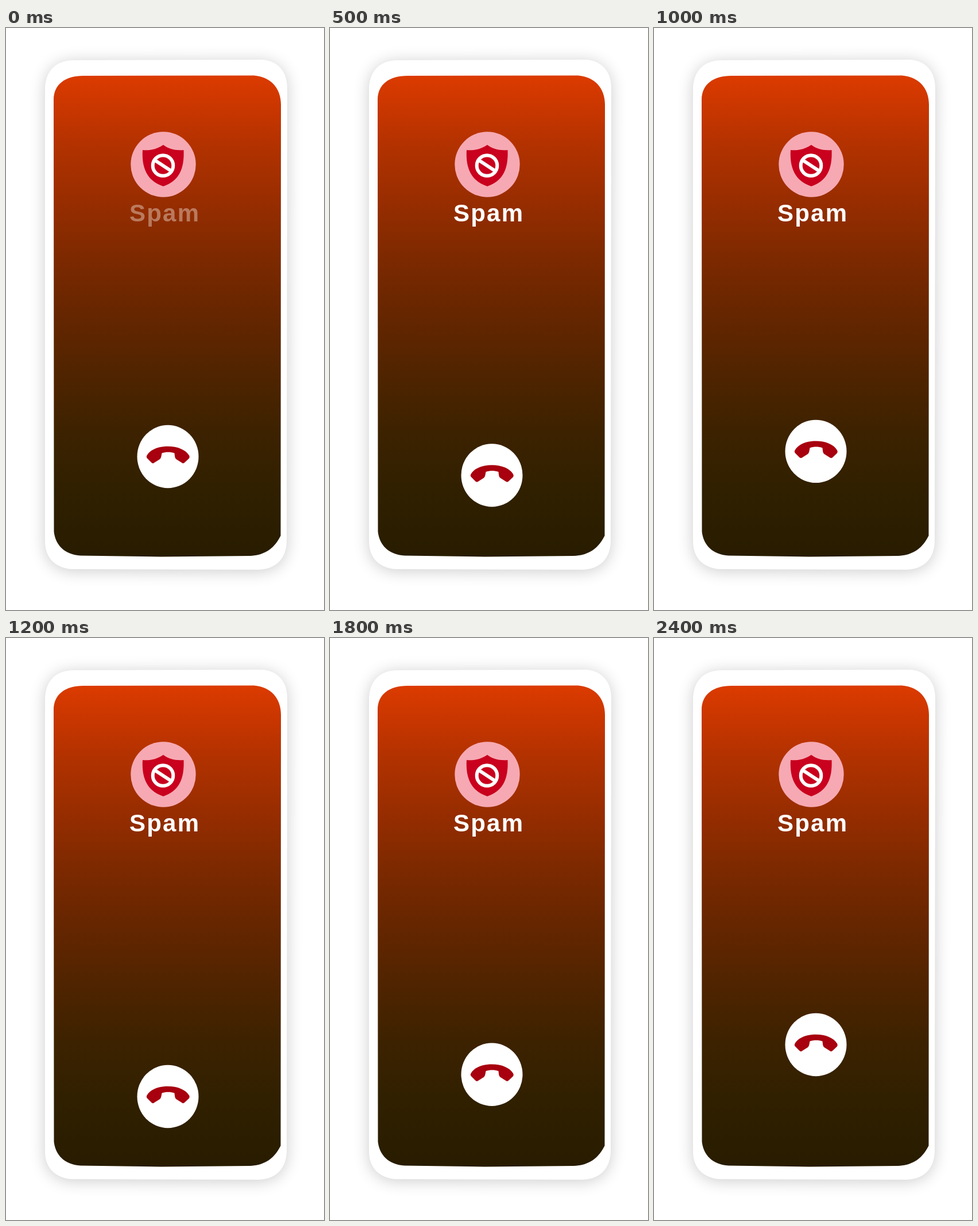
Write an HTML page that moves like this. It is 554 px wide and 1011 px high and loops after 2.5 s.

```html
<!DOCTYPE html>
<html lang="en">
<head>
<meta charset="utf-8">
<title>Spam call</title>
<style>
  html, body { margin: 0; width: 100%; height: 100%; overflow: hidden; background: #fff; }
  svg { display: block; width: 100%; height: 100%; }
  text { font: bold 42px "Liberation Sans", Arial, sans-serif; letter-spacing: 2.2px; }
</style>
</head>
<body>
<svg viewBox="0 0 554 1011">
  <defs>
    <linearGradient id="screenFill" gradientUnits="userSpaceOnUse" x1="0" y1="82" x2="0" y2="918">
      <stop offset="0" stop-color="#dc3b00"/>
      <stop offset=".07" stop-color="#c93600"/>
      <stop offset=".14" stop-color="#b43200"/>
      <stop offset=".26" stop-color="#982d00"/>
      <stop offset=".38" stop-color="#7d2900"/>
      <stop offset=".5" stop-color="#652600"/>
      <stop offset=".62" stop-color="#502400"/>
      <stop offset=".74" stop-color="#3d2200"/>
      <stop offset=".86" stop-color="#302000"/>
      <stop offset="1" stop-color="#281c00"/>
    </linearGradient>
    <filter id="blur" x="-20%" y="-20%" width="140%" height="140%">
      <feGaussianBlur stdDeviation="14"/>
    </filter>
    <path id="body" d="M68 108C68 75 86 56 118 56L446 55C474 57 490 76 490 104L489 890C489 922 470 941 438 941L116 940C88 939 68 922 68 892Z"/>
  </defs>

  <use href="#body" y="3" opacity=".2" filter="url(#blur)"/>
  <use href="#body" fill="#fff"/>
  <path fill="url(#screenFill)" d="M83 125C83 98 103 83 135 83L432 82.5C462 85 479 105 479 133L478.500 882C465 909 445 916 425 917L270 918.500L130 916.500C102 915 86 898 83.500 875Z"/>

  <circle cx="274" cy="237" r="56.700" fill="#f6a9b3"/>
  <path fill="#c9001e" d="M274 203C263 210.500 252 213 238 212C236 245 247 266 274 275C301 266 311 245 309.500 212C295 213 284 210.500 274 203Z"/>
  <g fill="none" stroke="#fff" stroke-width="6">
    <circle cx="273.500" cy="239" r="17.800"/>
    <path d="M259 229.500L288 248.500"/>
  </g>
  <text id="label" x="215" y="336" fill="#fff">Spam</text>

  <g id="button">
    <ellipse rx="53.500" ry="54.700" fill="#fff"/>
    <path fill="#a8000f" d="M-36.500 -2C-31 -12 -17 -17.800 0 -17.800C17 -17.800 31 -12 37 -2C38 0 38 2 36.500 3.500L29 10.500C27.500 12 25.500 12 24 10.500L14.500 4.500C12.500 3 12 0 11.500 -6C5 -8.500 -4 -8.500 -10.500 -6C-11.500 0 -12 3 -14 4.500L-23.500 10.500C-25 12 -27 12 -28.500 10.500L-36 3C-37.500 1.500 -37.500 0 -36.500 -2Z"/>
  </g>
</svg>
<script>
const LOOP = 2500, STEP = 100;
const label = document.getElementById("label");
const button = document.getElementById("button");

// Button heights along its up-and-down path: [step, y]
const path = [
  [0, 744.5], [1.5, 715], [3, 734], [5, 777], [7, 746.5],
  [9, 714], [12, 796.5], [16, 732.5], [20, 784], [24, 706.5]
];

// Slope at a point: flat at turning points, average elsewhere
function slope(i) {
  const before = path[i - 1], here = path[i], after = path[i + 1];
  if (!before || !after) return 0;
  const turning = (here[1] - before[1]) * (after[1] - here[1]) <= 0;
  return turning ? 0 : (after[1] - before[1]) / (after[0] - before[0]);
}

function heightAt(step) {
  let i = 0;
  while (i < path.length - 2 && step >= path[i + 1][0]) i++;
  const [x0, y0] = path[i], [x1, y1] = path[i + 1];
  const span = x1 - x0, u = (step - x0) / span, v = 1 - u;
  return v * v * (1 + 2 * u) * y0 + u * u * (3 - 2 * u) * y1
       + span * u * v * (v * slope(i) - u * slope(i + 1));
}

function draw(now) {
  const step = Math.floor((now % LOOP) / STEP);
  label.setAttribute("opacity", Math.min(1, 0.37 + 0.27 * step));
  button.setAttribute("transform", `translate(282 ${heightAt(step)})`);
}

const start = performance.now();
function tick() {
  draw(performance.now() - start);
  requestAnimationFrame(tick);
}
tick();
</script>
</body>
</html>
```
